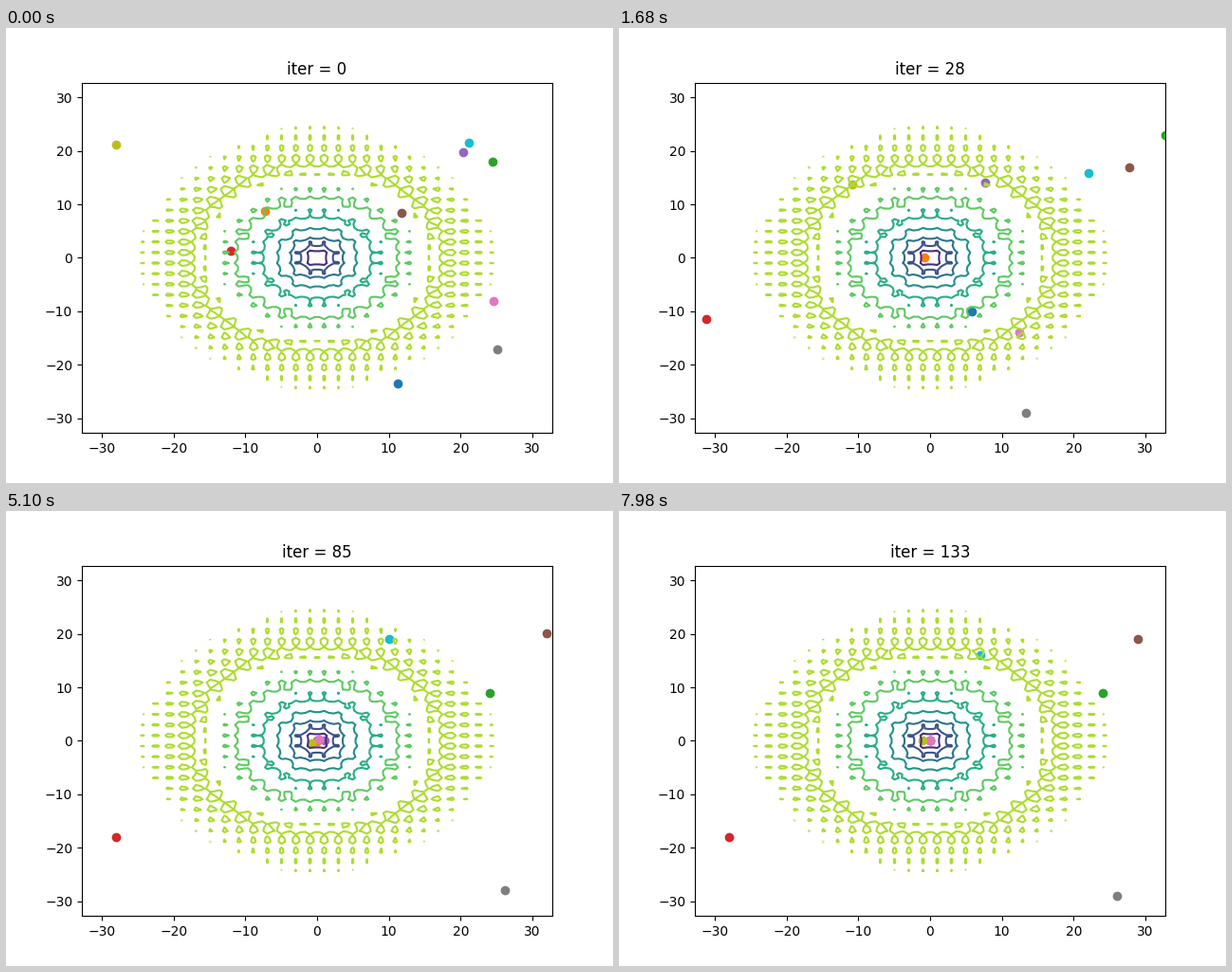
Write a matplotlib script that moves like this. It is 640 by 480 pixels and loops after 8 s.

```python
import numpy as np
import matplotlib.pyplot as plt
from matplotlib.animation import FuncAnimation

LIMIT = 32.768
TICK_MS = 20
TICKS_PER_ITER = 3
FRAMES = 8000 // TICK_MS
t = np.arange((FRAMES - 1) // TICKS_PER_ITER + 1)

STOPS = np.array([0, 12, 28, 60])
HOP = 12     # iterations a late jump takes
PULL = 0.92  # share of the distance to the optimum kept per iteration


def ackley(x, y):
    bowl = -20 * np.exp(-0.2 * np.sqrt((x**2 + y**2) / 2))
    ripple = -np.exp((np.cos(2 * np.pi * x) + np.cos(2 * np.pi * y)) / 2)
    return bowl + ripple + 20 + np.e


def fly(*points):
    """Smooth flight through the stops, coming to rest at the last one."""
    p = np.array(points)
    v = np.gradient(p, STOPS)
    v[-1] = 0
    k = np.clip(np.searchsorted(STOPS, t, side="right") - 1, 0, len(STOPS) - 2)
    h = np.diff(STOPS)[k]
    u = np.clip((t - STOPS[k]) / h, 0, 1)
    ease = u * u * (3 - 2 * u)
    bend = u * (1 - u)**2 * v[k] - u**2 * (1 - u) * v[k + 1]
    return p[k] + (p[k + 1] - p[k]) * ease + h * bend


def hop(path, end, goal):
    """Jump from the resting place to a neighbouring minimum."""
    u = np.clip((t - end) / HOP + 1, 0, 1)
    path += (goal - path[end - HOP]) * u * u * (3 - 2 * u)


def converge(path):
    path *= PULL ** np.maximum(t - STOPS[-1], 0)


# Positions are complex numbers x + yj.
blue = fly(11.2 - 23.5j, 10.3 - 10.9j, 5.75 - 10.1j, -0.1 + 0.2j)
orange = fly(-7.3 + 8.7j, -3.8 - 7.2j, -0.75 + 0j, 0.15 - 0.6j)
green = fly(24.5 + 18j, 31.5 + 9.3j, 32.8 + 22.9j, 26 + 11j)
red = fly(-12 + 1.3j, -30.1 - 3j, -31.2 - 11.5j, -28 - 18j)
purple = fly(20.4 + 19.7j, 16.8 + 17j, 7.7 + 14.1j, 1.9 + 2.2j)
brown = fly(11.8 + 8.4j, 19.1 + 9.8j, 27.7 + 16.9j, 32 + 20.1j)
pink = fly(24.6 - 8j, 19.2 - 15.7j, 12.4 - 14j, 2 + 2.4j)
gray = fly(25.1 - 17.1j, 17.75 - 25.3j, 13.4 - 29j, 26.9 - 26j)
olive = fly(-28 + 21.1j, -12.8 + 11j, -10.9 + 13.7j, -0.3 + 1.6j)
cyan = fly(21.2 + 21.5j, 31.9 + 32.7j, 22 + 15.8j, 11 + 21.1j)
swarm = [blue, orange, green, red, purple, brown, pink, gray, olive, cyan]

for path in (blue, orange, pink):
    converge(path)
hop(green, 84, 24 + 9j)
hop(gray, 84, 26.2 - 28j)
hop(cyan, 84, 10 + 19j)
hop(purple, 84, 1)
hop(olive, 84, -0.8 - 0.4j)
hop(brown, 97, 29 + 19j)
hop(gray, 97, 26 - 29j)
hop(cyan, 97, 7 + 16j)
hop(olive, 110, 0.9j)
hop(purple, 130, 0)
hop(olive, 130, -1)

fig, ax = plt.subplots(figsize=(6.4, 4.8), dpi=100)
axis = np.linspace(-LIMIT, LIMIT, 100)
X, Y = np.meshgrid(axis, axis)
ax.contour(X, Y, ackley(X, Y))
dots = [ax.scatter(path[0].real, path[0].imag) for path in swarm]
ax.set(xlim=(-LIMIT, LIMIT), ylim=(-LIMIT, LIMIT))
title = ax.set_title("iter = 0")


def update(frame):
    step = frame // TICKS_PER_ITER
    for dot, path in zip(dots, swarm):
        dot.set_offsets((path[step].real, path[step].imag))
    title.set_text(f"iter = {step}")
    return [*dots, title]


anim = FuncAnimation(fig, update, frames=FRAMES, interval=TICK_MS,
                     repeat=True, repeat_delay=0)
plt.show()
```
